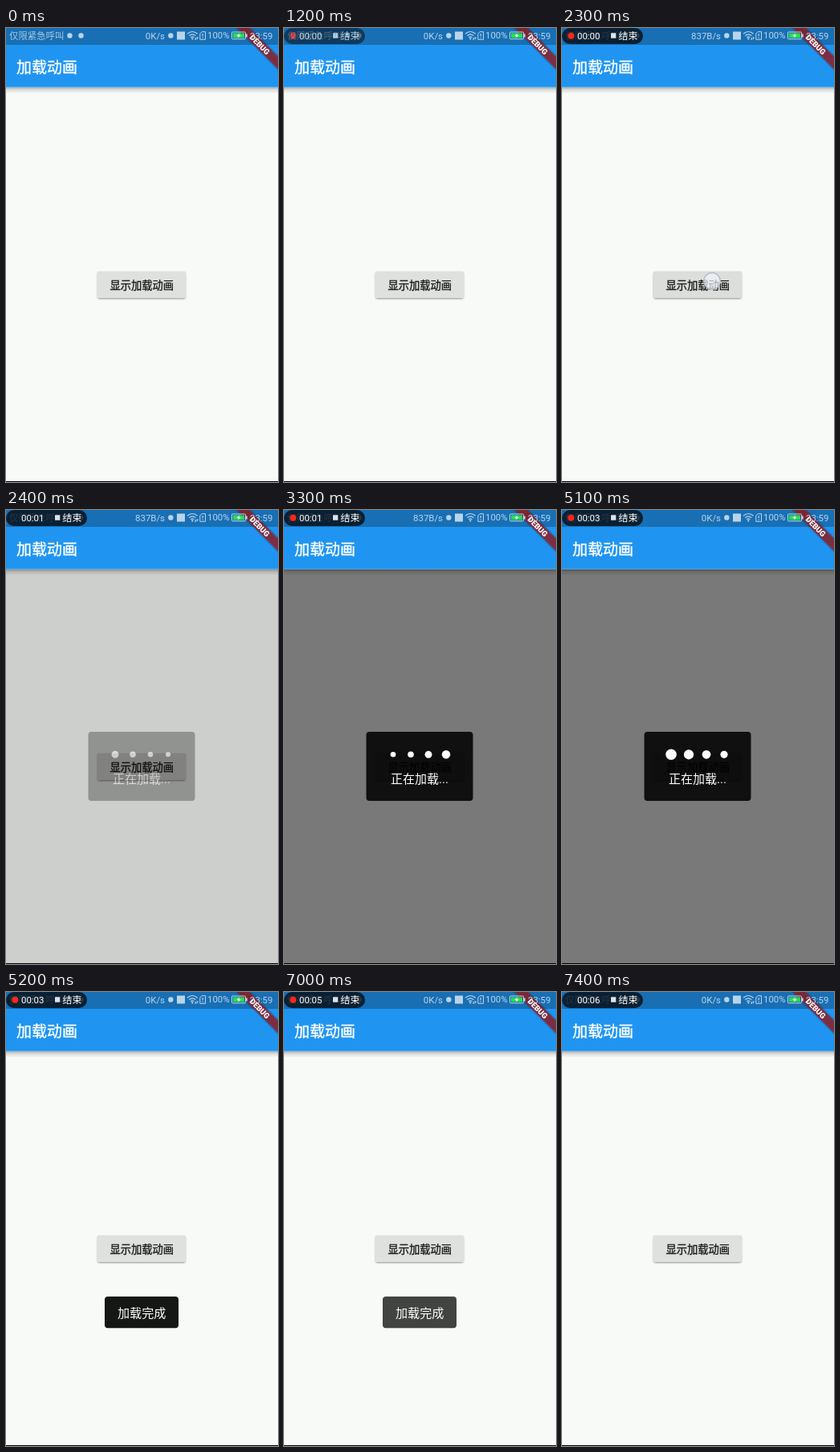
An HTML page for the animation above (7500 ms loop, 339x565 px).

```html
<!DOCTYPE html>
<html lang="zh-CN">
<head>
<meta charset="utf-8">
<title>加载动画</title>
<style>
  html, body { margin: 0; width: 100%; height: 100%; overflow: hidden; background: #f8faf7; }
  svg { display: block; width: 339px; height: 565px; }
  text { font-family: Roboto, "Noto Sans CJK SC", "Noto Sans CJK", sans-serif; fill: #fff; white-space: pre; }
  .medium { stroke-width: .35; font-weight: 500; }
  .status text { font-size: 11.4px; fill: #b9d4ea; }
  .status .line { fill: none; stroke: #b9d4ea; }
  .mark { fill: #b9d4ea; }
</style>
</head>
<body>
<svg viewBox="0 0 339 565" xmlns="http://www.w3.org/2000/svg">
  <defs>
    <filter id="soft" x="-20%" y="-50%" width="140%" height="200%"><feGaussianBlur stdDeviation="1.1"/></filter>
    <linearGradient id="fall" x2="0" y2="1">
      <stop offset="0" stop-color="#000" stop-opacity=".32"/>
      <stop offset=".4" stop-color="#000" stop-opacity=".12"/>
      <stop offset="1" stop-color="#000" stop-opacity="0"/>
    </linearGradient>
  </defs>

  <rect width="339" height="565" fill="#f8faf7"/>
  <rect y="73.6" width="339" height="8" fill="url(#fall)"/>

  <g id="button">
    <rect x="114.3" y="304.5" width="109.2" height="32.5" rx="2" fill="#000" opacity=".42" filter="url(#soft)"/>
    <rect id="face" x="113.5" y="302.7" width="110.7" height="33.3" rx="2" fill="#dfe1de"/>
    <text class="medium" x="129.4" y="325" font-size="13.3" style="fill:#1c1d1c;stroke:#1c1d1c">显示加载动画</text>
  </g>

  <g id="touch">
    <circle cx="187" cy="315" r="10.3" fill="#f1f4fa" fill-opacity=".7" stroke="#b3bacb" stroke-width="1.2"/>
  </g>

  <rect id="barrier" y="73.6" width="339" height="490.4" fill="#000" fill-opacity=".515"/>

  <g id="dialog">
    <rect x="102.5" y="276" width="133" height="86" rx="4" fill="#000" fill-opacity=".87"/>
    <g id="dots" fill="#fff"></g>
    <text x="133" y="340" font-size="15">正在加载...</text>
  </g>

  <g id="toast">
    <rect x="123" y="379" width="92" height="39.3" rx="4" fill="#151715"/>
    <text x="139" y="405.3" font-size="15.1">加载完成</text>
  </g>

  <rect y="564" width="339" height="1"/>

  <rect width="339" height="73.6" fill="#1f95f1"/>
  <rect width="339" height="21" fill="#196fb4"/>
  <text class="medium" x="13" y="56" font-size="19" stroke="#fff">加载动画</text>

  <g transform="translate(339 -2) rotate(45)">
    <rect x="-42" y="26.4" width="84" height="11.3" fill="#000" opacity=".45" filter="url(#soft)"/>
    <rect x="-42" y="26.4" width="84" height="11.3" fill="#b71c1c" fill-opacity=".63"/>
    <text y="35.5" font-size="9.6" font-weight="900" text-anchor="middle">DEBUG</text>
  </g>

  <g class="status">
    <text x="4" y="14" opacity=".88">仅限紧急呼叫</text>
    <circle class="mark" cx="79.5" cy="9.5" r="3.2"/>
    <circle class="mark" cx="93.5" cy="9.5" r="3.2"/>
    <text id="speed" x="198" y="13.8" text-anchor="end"></text>
    <circle class="mark" cx="205.3" cy="9.5" r="3.2"/>
    <rect class="mark" x="213" y="4.5" width="10" height="10"/>
    <path class="line" d="M226 7.2Q232.3 1.8 238.6 7.2M228.2 9.6Q232.3 6 236.4 9.6M230.2 11.8Q232.3 10 234.4 11.8" stroke-width="1.2"/>
    <circle class="mark" cx="232.3" cy="13.4" r="1.1"/>
    <path id="arrows" class="mark" d="M235 14.5l1.3-3 1.3 3zM237.3 11.5h2.6l-1.3 3z"/>
    <path class="line" d="M244 4.7h4.5v9.6h-6.7v-7.3z"/>
    <path class="line" d="M245.2 7v3.3M245.2 11.4v1.3" stroke-width="1.2"/>
    <text x="251" y="13.4">100%</text>
    <rect class="line" x="281.5" y="5" width="17" height="8.8" rx="1"/>
    <rect class="mark" x="299" y="7.5" width="1.7" height="4"/>
    <rect x="283" y="6.5" width="14" height="5.8" fill="#27dc50"/>
    <path d="M291.5 6.5l-4.5 3.4h2.7l-1 2.6 4.4-3.5h-2.7z" fill="#effff2"/>
    <text x="304" y="13.8">23:59</text>
  </g>

  <g id="pill">
    <rect width="101" height="20" rx="10" fill="#03080e" fill-opacity=".77"/>
    <circle id="rec" cx="11.3" cy="9.7" r="4" fill="#fb2618"/>
    <text id="timer" x="19" y="13.7" font-size="11.4"></text>
    <rect x="61" y="6.3" width="6.2" height="6.4" fill="#dfe3e7"/>
    <text x="70.6" y="13.9" font-size="11.8">结束</text>
  </g>
</svg>

<script>
const LOOP = 7500, STEP = 100;
const TICKS = [2400, 3400, 4300, 5300, 6200, 7200];
const $ = id => document.getElementById(id);
const clamp = v => Math.max(0, Math.min(1, v));
const within = (t, from, to) => t >= from && t < to;
const fade = (id, alpha) => $(id).setAttribute("opacity", alpha);

const dots = [0, 1, 2, 3].map(i => {
  const dot = document.createElementNS("http://www.w3.org/2000/svg", "circle");
  dot.setAttribute("cx", 136 + 22 * i);
  dot.setAttribute("cy", 304.3);
  return $("dots").appendChild(dot);
});

// Each dot pulses with a small lag behind its left neighbour.
function pulse(t) {
  dots.forEach((dot, i) => {
    const angle = (240 + (t - 3300) / 1240 * 360 - 20 * i) * Math.PI / 180;
    dot.setAttribute("r", 5.25 + 2.25 * Math.sin(angle));
  });
}

function draw(t) {
  const seconds = TICKS.filter(tick => t >= tick).length;
  const blink = TICKS.some(tick => within(t, tick, tick + 500));
  fade("pill", clamp((t - 1000) / 300));
  fade("rec", blink ? 0 : 1);
  $("timer").textContent = "00:0" + seconds;
  $("speed").textContent = within(t, 1300, 4300) ? "837B/s" : "0K/s";
  fade("arrows", within(t, 2900, 5200) ? 0 : 1);

  fade("touch", within(t, 1300, 2400) ? 1 : 0);
  $("face").setAttribute("fill", within(t, 2200, 2500) ? "#dcdedb" : "#dfe1de");

  const shown = t < 5200 ? clamp((t - 2300) / 300) : 0;
  fade("barrier", shown);
  fade("dialog", shown);
  pulse(t);

  fade("toast", t < 5200 ? 0 : clamp((7400 - t) / 500));
}

const start = performance.now();
function frame(now) {
  const t = Math.max(0, now - start) % LOOP;
  draw(Math.floor(t / STEP) * STEP);
  requestAnimationFrame(frame);
}
draw(0);
requestAnimationFrame(frame);
</script>
</body>
</html>
```
